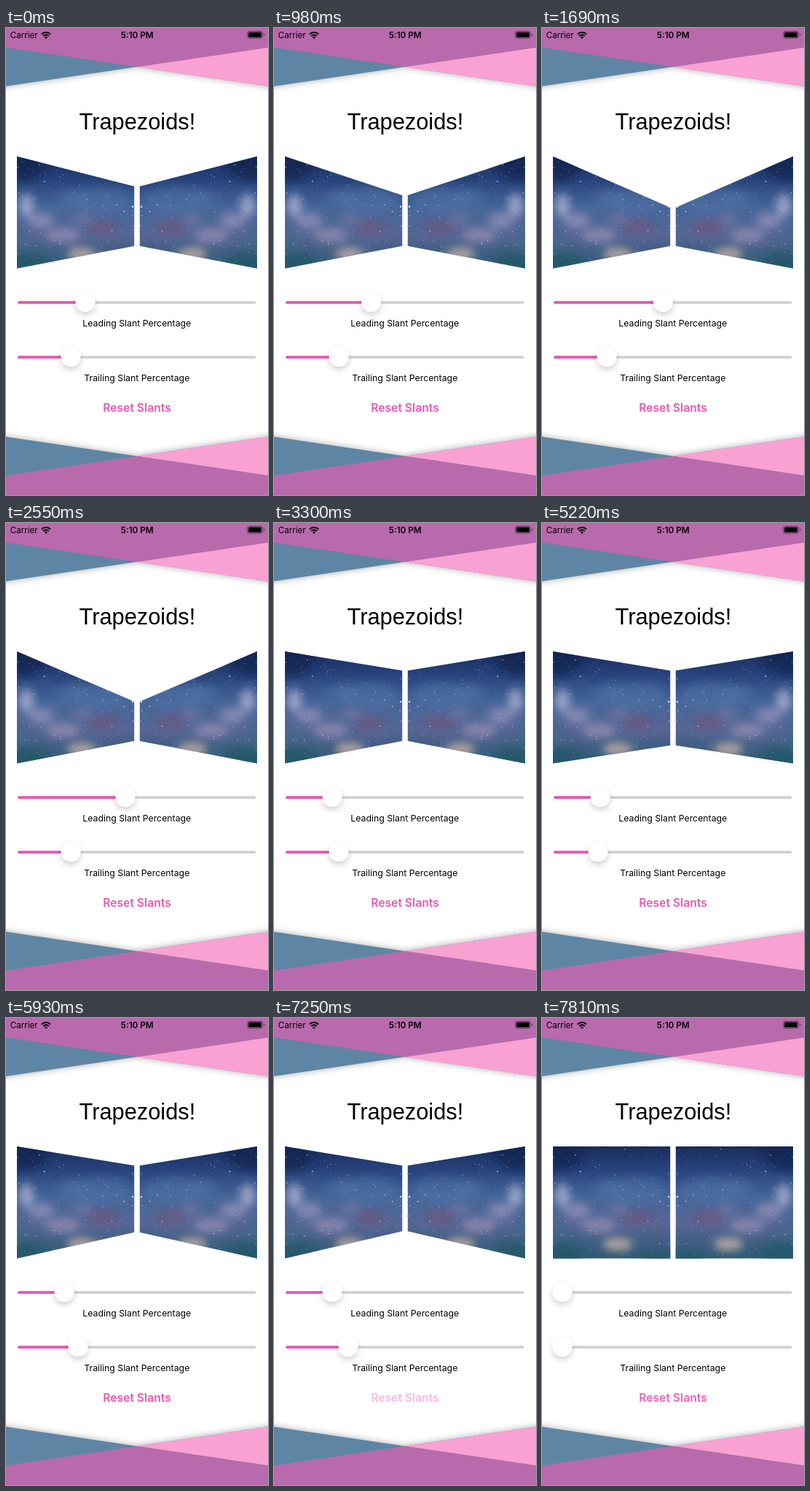
An HTML page for the animation above (8000 ms loop, 360 by 640 pixels).

```html
<!DOCTYPE html>
<html lang="en">
<head>
<meta charset="utf-8">
<title>Trapezoids</title>
<style>
  html, body { margin: 0; width: 100%; height: 100%; overflow: hidden; background: #fff; }
  svg { display: block; width: 100vw; height: 100vh; }
  text { font-family: Inter, "Open Sans", sans-serif; text-anchor: middle; }
  .label { font-size: 12.3px; }
  .title { font: 30.8px "Liberation Sans", Arial, sans-serif; }
  .button { font-size: 15.7px; font-weight: 600; fill: #e95ab4; }
  .status { font-size: 11.6px; }
  .clock { font-size: 11.7px; font-weight: 600; }
  .track { stroke: #d2d2d4; stroke-width: 3.7; stroke-linecap: round; }
  .fill { stroke: #ea57b3; stroke-width: 3.7; stroke-linecap: round; }
</style>
</head>
<body>
<svg viewBox="0 0 360 640">
  <defs>
    <filter id="bandShadow" x="-10%" y="-40%" width="120%" height="180%">
      <feDropShadow dx="0" dy="0" stdDeviation="5" flood-color="#000" flood-opacity=".33"/>
    </filter>
    <filter id="knobShadow" x="-60%" y="-60%" width="220%" height="260%">
      <feDropShadow dx="0" dy="4" stdDeviation="4" flood-color="#000" flood-opacity=".19"/>
    </filter>
    <filter id="soft" x="-80%" y="-80%" width="260%" height="260%">
      <feGaussianBlur stdDeviation="6"/>
    </filter>
    <linearGradient id="sky" x2="0" y2="1">
      <stop offset="0" stop-color="#1a2b5c"/>
      <stop offset=".2" stop-color="#26427a"/>
      <stop offset=".45" stop-color="#456699"/>
      <stop offset=".7" stop-color="#566694"/>
      <stop offset="1" stop-color="#2c5a72"/>
    </linearGradient>
    <clipPath id="cut"><polygon id="cutShape"/></clipPath>

    <!-- One corner pair: the left and right slants cross at the middle -->
    <g id="bands" filter="url(#bandShadow)">
      <path d="M-20-20H380V82.96L180 53.33-20 82.96Z" fill="#5e85a4"/>
      <path d="M180 53.33L380 23.7V82.96Z" fill="#f9a1d3"/>
      <path d="M-20-20H380V23.7L180 53.33-20 23.7Z" fill="#b96bad"/>
    </g>
  </defs>

  <rect width="360" height="640" fill="#fff"/>
  <use href="#bands"/>
  <use href="#bands" transform="matrix(1 0 0 -1 0 640)"/>

  <!-- Status bar -->
  <text class="status" x="24.7" y="14">Carrier</text>
  <text class="clock" x="180.2" y="14">5:10 PM</text>
  <g fill="none" stroke="#000" stroke-width="2">
    <path d="M48.8 8.6a8.8 8.8 0 0 1 12.4 0M51.2 11.1a5.4 5.4 0 0 1 7.6 0"/>
    <path d="M55 15l-2.1-2.2a3 3 0 0 1 4.2 0Z" fill="#000" stroke="none"/>
  </g>
  <rect x="331.5" y="4.5" width="21" height="9.6" rx="2.6" fill="none" stroke="#000" stroke-opacity=".5"/>
  <rect x="333" y="5.8" width="18" height="7" rx="1.4"/>
  <path d="M354 7.6v3.4q1.4-.4 1.4-1.7T354 7.6Z" fill-opacity=".5"/>

  <text class="title" x="180.4" y="139">Trapezoids!</text>

  <!-- Night sky and its mirror -->
  <g id="photo" clip-path="url(#cut)">
    <rect x="14" y="175" width="163" height="156" fill="url(#sky)"/>
    <g id="clouds" filter="url(#soft)"></g>
    <g id="stars" fill="#dce6ff"></g>
  </g>
  <use href="#photo" transform="matrix(-1 0 0 1 360 0)"/>

  <g id="sliders"></g>
  <text class="label" x="179.8" y="409.3">Leading Slant Percentage</text>
  <text class="label" x="179.8" y="484.3">Trailing Slant Percentage</text>
  <text class="button" id="reset" x="180" y="526">Reset Slants</text>
</svg>

<script>
const LOOP = 8000, MIN = 28, SPAN = 304;
const $ = id => document.getElementById(id);

function add(parent, name, attrs) {
  const el = document.createElementNS("http://www.w3.org/2000/svg", name);
  for (const k in attrs) el.setAttribute(k, attrs[k]);
  return parent.appendChild(el);
}

// x, y, rx, ry, colour, opacity
[
  [22, 186, 34, 24, "#14234f", .7],
  [130, 236, 40, 18, "#5274a8", .5],
  [92, 232, 22, 10, "#5877a8", .5],
  [28, 243, 10, 16, "#c0bfdc", .65],
  [48, 264, 18, 11, "#a39cc4", .6],
  [78, 284, 24, 10, "#a497bd", .6],
  [132, 273, 22, 10, "#6d5780", .75],
  [105, 262, 14, 8, "#7f7fa9", .5],
  [20, 292, 12, 16, "#41688a", .6],
  [28, 320, 32, 14, "#235768", .75],
  [104, 310, 20, 9, "#d2b7aa", .75],
  [160, 308, 14, 12, "#3f5c86", .6],
  [158, 326, 22, 9, "#245a68", .75]
].forEach(([cx, cy, rx, ry, fill, opacity]) =>
  add($("clouds"), "ellipse", { cx, cy, rx, ry, fill, opacity }));

let seed = 11;
const rand = () => (seed = seed * 16807 % 2147483647) / 2147483647;
for (let i = 0; i < 320; i++) {
  add($("stars"), "circle", {
    cx: 15 + rand() * 161, cy: 176 + rand() * 153,
    r: .35 + .5 * rand() ** 3, opacity: .2 + .65 * rand()
  });
}
add($("stars"), "circle", { cx: 174, cy: 245, r: 1.2 });

function slider(y) {
  const g = $("sliders"), line = { x1: 18, x2: 341.5, y1: y, y2: y };
  add(g, "line", { ...line, class: "track" });
  const fill = add(g, "line", { ...line, class: "fill" });
  const knob = add(g, "circle", { cy: y - .6, r: 13.4, fill: "#fff", filter: "url(#knobShadow)" });
  return x => {
    fill.setAttribute("x2", x);
    knob.setAttribute("cx", x);
  };
}
const setLead = slider(376.2), setTrail = slider(451.2);

// Bursts of screen updates: first, last, count
const ticks = [0];
[
  [500, 830, 4], [980, 1180, 3], [1340, 1540, 3], [1690, 1690, 1],
  [2090, 2200, 2], [2450, 2550, 2], [2700, 2700, 1], [2850, 2950, 2],
  [3100, 3300, 3], [4410, 4410, 1], [4560, 4770, 3], [4920, 5420, 6],
  [5570, 5780, 3], [5930, 5930, 1], [6090, 6350, 3], [7250, 7810, 6]
].forEach(([from, to, n]) => {
  for (let i = 0; i < n; i++) ticks.push(from + (n > 1 ? (to - from) * i / (n - 1) : 0));
});

// Time, value
const lead = [[400, 109], [1690, 166.5], [2000, 166.5], [2550, 164], [3300, 80], [7300, 80], [7800, MIN]];
const trail = [[4300, 89], [5220, 77], [5930, 99], [6350, 102], [7300, 102], [7800, MIN]];
const dim = [[7249, 1], [7250, .4], [7400, .4], [7810, .92]];

function at(keys, t) {
  const i = keys.findIndex(k => k[0] > t);
  if (i < 0) return keys[keys.length - 1][1];
  if (i === 0) return keys[0][1];
  const [t0, a] = keys[i - 1], [t1, b] = keys[i];
  const p = (t - t0) / (t1 - t0);
  return a + (b - a) * p * p * (3 - 2 * p);
}

function draw(now) {
  const time = now % LOOP;
  const t = ticks.filter(v => v <= time + .5).pop();
  const a = at(lead, t), b = at(trail, t);
  setLead(a);
  setTrail(b);
  const top = 176 + 153.5 * (a - MIN) / SPAN;
  const bottom = 329.5 - 153.5 * (b - MIN) / SPAN;
  $("cutShape").setAttribute("points", `15,176 176.2,${top} 176.2,${bottom} 15,329.5`);
  $("reset").setAttribute("opacity", at(dim, t));
}

const start = performance.now();
function loop() {
  draw(performance.now() - start);
  requestAnimationFrame(loop);
}
loop();
</script>
</body>
</html>
```
